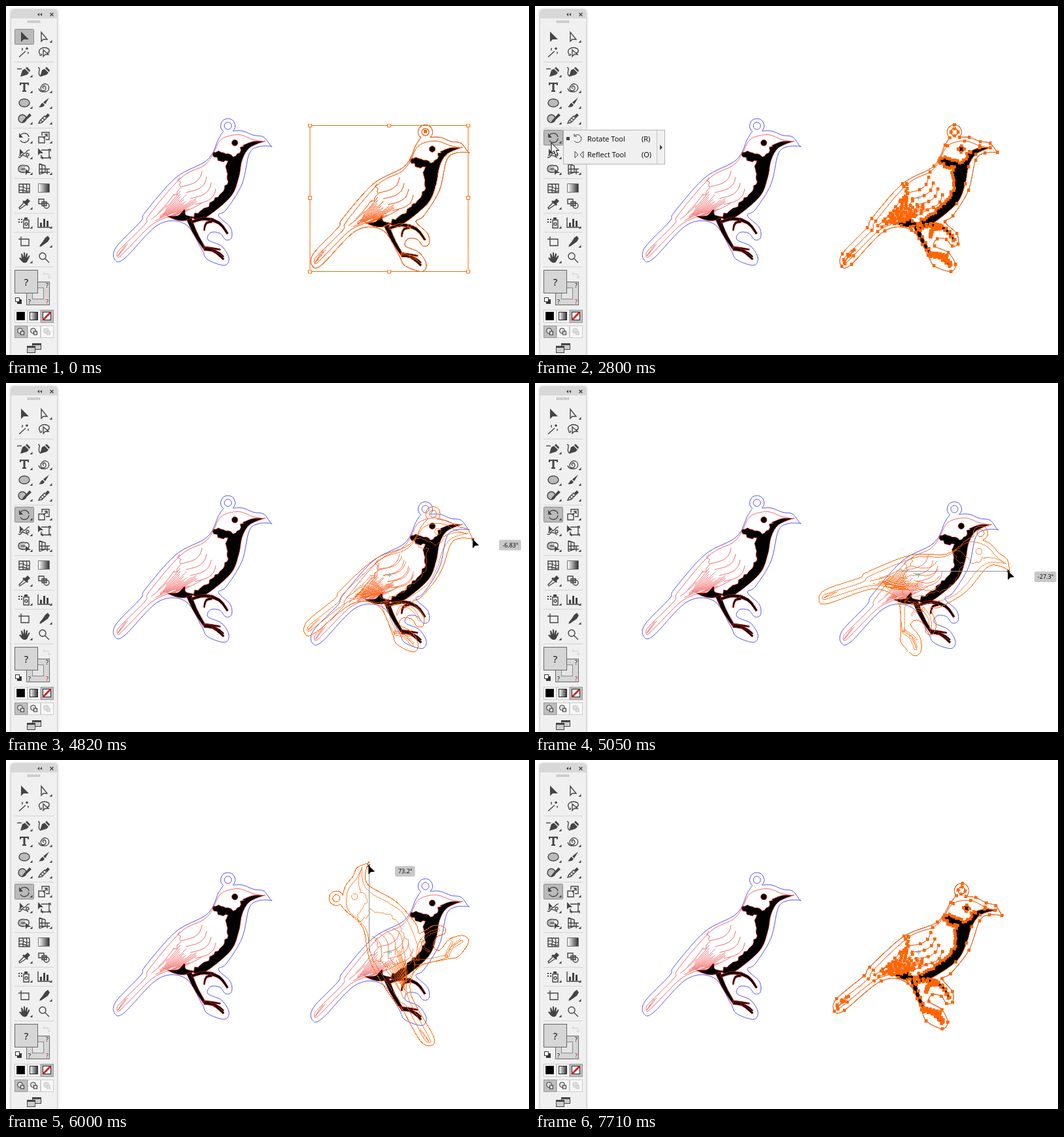
An HTML page for the animation above (8 s loop, 800 by 533 pixels).

```html
<!DOCTYPE html>
<html lang="en">
<head>
<meta charset="utf-8">
<title>Rotating a bird drawing</title>
<style>
  html, body { margin: 0; width: 100%; height: 100%; overflow: hidden; background: #fff; }
  :root { --cut: #5454f4; --score: #ee4545; --edge: #e22; --ink: #000; }
  svg { display: block; width: 800px; height: 533px; font: 9px "Open Sans", "Noto Sans", sans-serif; }
  path { fill: none; }
  .cut { stroke: var(--cut); }
  .score { stroke: var(--score); stroke-width: .8; }
  .ink { stroke: var(--edge); stroke-width: .7; fill: var(--ink); }
  .wire { --cut: #f60; --score: #f60; --edge: #f60; --ink: none; shape-rendering: crispEdges; }
  .dots { marker: url(#dot); }
  .solid { fill: #444; }
  .line { stroke: #444; stroke-width: 1.4; }
  .tint { fill: #bbb; }
  .pink { fill: #f04be0; }
  #panel { filter: drop-shadow(0 0 2px #0006); }
</style>
</head>
<body>
<svg viewBox="0 0 800 533">
  <defs>
    <marker id="dot" markerUnits="userSpaceOnUse" markerWidth="5" markerHeight="5" refX="2.5" refY="2.5">
      <path d="M0 0h5v5H0z" style="fill:#f60"/>
    </marker>
    <marker id="handle" markerUnits="userSpaceOnUse" markerWidth="6" markerHeight="6" refX="3" refY="3">
      <path d="M.5.5h5v5h-5z" style="fill:#fff" stroke="#f60"/>
    </marker>
    <linearGradient id="fade"><stop stop-color="#fff"/><stop offset="1" stop-color="#333"/></linearGradient>
    <g id="bird"></g>
  </defs>

  <use href="#bird"/>
  <use href="#bird" id="copy"/>
  <use href="#bird" id="wire" class="wire"/>
  <path id="pivot" d="M583 293.5h7M586.5 290v7" stroke="#4cc"/>
  <g id="box">
    <path d="M465 182.5H586H707V293V405.5H586H465V293Z" stroke="#f60" marker-start="url(#handle)" marker-mid="url(#handle)"/>
    <rect x="639" y="189" width="5" height="5" fill="#f60"/>
  </g>

  <g id="panel">
    <rect x="8" y="6" width="70" height="540" rx="3" fill="#f0f0f0"/>
    <path d="M8 19V9q0-3 3-3h64q3 0 3 3v10z" style="fill:#d8d8d8"/>
  </g>
  <path class="solid" d="M51 10.5l-3 2.5 3 2.5zM55 10.5l-3 2.5 3 2.5z"/>
  <path class="line" d="M67.5 10.5l5 5m0-5l-5 5"/>
  <path d="M33 24h20" stroke="#aaa" stroke-width="4" stroke-dasharray="1 1"/>
  <rect id="hover" width="29" height="23" rx="1" fill="#fcfcfc" stroke="#c4c4c4"/>
  <rect id="active" x="13.5" width="29" height="23" rx="1" fill="#bababa" stroke="#8c8c8c"/>
  <g id="icons"></g>

  <g fill="#d6d6d6" stroke="#666">
    <rect x="31.5" y="421.5" width="35" height="35"/>
    <rect x="40.5" y="430.5" width="17" height="17" fill="#e4e4e4" stroke="#888"/>
    <rect x="13.5" y="403.5" width="35" height="35"/>
    <path d="M59 407l-2 2.5h7q2 0 2 2v4m-2-2l2 2 2-2" stroke="#ccc"/>
    <rect x="17.5" y="448.5" width="6" height="6" fill="#333" stroke="#333"/>
    <rect x="14.5" y="445.5" width="6" height="6" fill="#fff" stroke="#333"/>
  </g>
  <g text-anchor="middle">
    <text x="31" y="427" font-size="15">?</text>
    <text x="63" y="430">?</text><text x="36" y="455">?</text><text x="63" y="455" fill="#c00">?</text>
  </g>
  <g id="swatches"></g>
  <g fill="#ccc" stroke="#444">
    <rect x="40.5" y="515.5" width="13" height="9"/><rect x="32.5" y="519.5" width="12" height="10"/>
    <path d="M33 521h11M41 517h12" stroke-width="2"/>
  </g>

  <g id="flyout" font-size="11">
    <rect x="43.5" y="189.5" width="155" height="52" fill="#f0f0f0" stroke="#b4b4b4"/>
    <rect id="row" x="44" y="190" width="142" height="25" fill="#d4d4d4"/>
    <path d="M186.5 190v51" stroke="#c4c4c4"/>
    <path class="solid" d="M48 200h5v5h-5zM191 212l4 4-4 4z"/>
    <path d="M60 199a6 6 0 1 1 0 7M60 195v4h4M61 222l5 5-5 5zM74 222l-5 5 5 5z" stroke="#444"/>
    <text x="80" y="207">Rotate Tool</text><text x="163" y="207">(R)</text>
    <text x="80" y="231">Reflect Tool</text><text x="163" y="231">(O)</text>
  </g>

  <path id="guide" stroke="#909090"/>
  <g id="snap">
    <path d="M576.5 258V389M390 387l5 5m0-5l-5 5M574 256l5 5m0-5l-5 5" stroke="#f04be0"/>
    <text class="pink" x="579" y="385">intersect</text>
  </g>
  <text id="anchor" class="pink" x="712" y="235">anchor</text>
  <g id="tip">
    <path d="M-2-2l4 4m0-4l-4 4" stroke="#000"/>
    <rect id="plate" x="40" y="1" height="16" rx="2" fill="#c8c8c8"/>
    <text id="angle" x="45" y="12"></text>
  </g>
  <path id="cursor" stroke="#000"/>
</svg>

<script>
const $ = id => document.getElementById(id);
const show = (id, on) => $(id).style.display = on ? "" : "none";
const path = (cls, d) => `<path class="${cls}" d="${d}"/>`;
const list = (n, make) => Array.from({ length: n }, (_, i) => make(i));

let seed = 7;
const random = () => (seed = seed * 16807 % 2147483647) / 2147483647;

// Smooth path through "x,y x,y ..." points
const curve = text => {
  const p = text.split(" ").map(s => s.split(",").map(Number));
  return p.slice(1).reduce((d, b, i) => {
    const a = p[i], before = p[i - 1] || a, after = p[i + 2] || b;
    const c1 = a.map((v, k) => v + (b[k] - before[k]) / 6);
    const c2 = b.map((v, k) => v - (after[k] - a[k]) / 6);
    return `${d}C${c1} ${c2} ${b}`;
  }, "M" + p[0]);
};
const sample = (d, n) => {
  const line = document.createElementNS("http://www.w3.org/2000/svg", "path");
  line.setAttribute("d", d);
  return list(n + 1, i => {
    const { x, y } = line.getPointAtLength(line.getTotalLength() * i / n);
    return [x, y];
  });
};
// Move points sideways by amount(0..1 along the line)
const shift = (points, amount) => points.map(([x, y], i) => {
  const last = points.length - 1, a = points[Math.max(i - 1, 0)], b = points[Math.min(i + 1, last)];
  const dx = b[0] - a[0], dy = b[1] - a[1], k = amount(i / last) / Math.hypot(dx, dy);
  return [x - dy * k, y + dx * k];
});
const limb = (text, from, to) => {
  const mid = sample(curve(text), 5), half = u => (from + (to - from) * u) / 2;
  return "M" + [...shift(mid, half), ...shift(mid, u => -half(u)).reverse()].join("L") + "Z";
};
const ragged = (text, n) => "M" + shift(sample(curve(text), n), () => (random() - .5) * 5).join("L");
const ring = (x, y, r) => `M${x - r} ${y}` + [[r, -r], [r, r], [-r, r], [-r, -r]].map(q => `a${r} ${r} 0 0 1 ${q}`).join("");

const outline = curve("347,191 362,191 379,197.5 394,200 405,214 405,214 386,215 372,226 361,272 337,311 325,320 343,338 345,354 336,357 327,347 313,346 309,357 330,367 341,385 334,396 308,387 299,371 274,333 233,334 182,385 167,388 168,369 206,329 213,315 260,262 308,235 325,203 332.5,191.5")
  + "A11 11 0 0 1 339.5 172A11 11 0 0 1 347 191Z";
const body = curve("394,207 378,204 355,196.5 329,204 316,228 302,244 267,263 219,319 213,333 176,370 170,378 172,384 185,372 222,335 247,322");
const bib = ragged("362,213 352,229 340,227 319,222 318,229 328,237 337,235 338,250 340,266 331,282 314,301 283,322", 50)
  + curve("283,323 302,325 343,292 356,262 361,236 372,217 394,207 394,207 378,207 362,213").replace("M", "L") + "Z";
const inks = [
  bib, curve("247,321 263,320 273,311 275,319 287,323 272,328 258,326 247,321"),
  limb("280,325 290,348 304,371", 8, 4), limb("302,369 314,370 328,372", 4, 2),
  limb("303,371 318,374 333,387", 5, 3), limb("315,372 326,377 333,383", 3, 2),
  limb("284,330 301,325 317,327", 4, 5), limb("313,326 328,333 339,348", 5, 3), limb("315,329 306,332 303,343", 4, 2),
  ring(350, 209, 4.7)
];
const scallops = list(4, i => {
  const x = 300 + 7 * i, y = 252 + 9 * i;
  return curve(`${x},${y} ${x - 4},${y + 11} ${x - 14},${y + 19} ${x - 32},${y + 24}`);
});
// Parts of long arcs that run together at the root of the tail
const feathers = list(18, i => {
  const u = i / 17, start = random() * .45, span = .3 + random() * .3;
  const x0 = 264 + 50 * u, y0 = 276 + 16 * u, x1 = 214 + 10 * u, y1 = 331;
  return curve(list(4, k => {
    const s = start + span * k / 3, sag = 16 * s * (1 - s);
    return [x0 + (x1 - x0) * s + sag / 2, y0 + (y1 - y0) * s + sag];
  }).join(" "));
});
const tail = [3, 6].map(i => curve(`${180 + i},${366 - i / 2} ${174 + i},${374 - i / 2} 171,382`));

$("bird").innerHTML = [outline, ring(339.5, 183, 5.5)].map(d => path("cut", d)).join("")
  + [body, ragged("264,262 266,276 258,290", 8), ...scallops, ...feathers, ...tail].map(d => path("score", d)).join("")
  + inks.map(d => path("ink", d)).join("");

// Rows of tools, in groups parted by a rule
const rows = [], rules = [];
let next = 47;
for (const size of [2, 4, 3, 2, 1, 2]) {
  for (let i = 0; i < size; i++, next += 24.2) rows.push(Math.floor(next));
  next += 4.6;
  rules.push(`M13 ${Math.floor(next - 15) + .5}h60`);
}
const rect = (x, y, w, h) => `M${x} ${y}h${w}v${h}h${-w}z`;
const nib = "M-6 8L-3-2L1-4L7 2L4 5ZM2-5L4-7L9-2L8 1Z";
// Solid part, line part, has corner mark, tinted part
const tools = [
  ["M-5-8V8L-1 4H7Z", "", 0],
  ["", "M-4-7V7L-1 4H5Z"],
  ["", "M-8 7L2-2M4-8v4M2-6h4M-3-7v4M6-1v3", 0],
  ["", "M-6 2C-11-4-2-9 4-7S9 0 5 1M-6 2c-1 4 4 3 2 0M-1-4V6L2 3H7Z", 0],
  [nib, "M-11-4H-4"],
  [nib, "M-9-6C-3-6-12 4-5 7", 0],
  ["M-7-7H7V-3H5V-5H1.5V5H3V7H-3V5H-1.5V-5H-5V-3H-7Z", ""],
  ["", "M0 2a2 2 0 1 1 2-3a4 4 0 1 1-6 0a6 6 0 1 1 6 8q-8 1-10-5"],
  ["", "M-8 0C-8-8 8-8 8 0S-8 8-8 0Z", 1, "M-8 0C-8-8 8-8 8 0S-8 8-8 0Z"],
  ["M8-8L2 2L-1-1ZM-2 0L1 3C-1 7-5 7-8 6C-5 5-5 1-2 0Z", ""],
  ["M8-8L11-5L0 5L-4 7L-2 3Z", ring(-3, 0, 6), 1, ring(-3, 0, 6)],
  ["M6-8L9-5L5-1L2-4Z", "M-8 7l2-4 7-7 3 3-7 7zM-5 2l3 3M-2-1l3 3"],
  ["M-8-7V0H-2Z", "M-6-3A7 7 0 0 1 7-1M7 1A7 7 0 0 1-6 4"],
  ["", rect(-8, -1, 9, 9) + "M-3-3V-8H8V3H3M-1 1L5-5M1-5H5V-1"],
  ["M-7-7L-1-1L-4 0L-7 3Z", "M-9 6C-3 8-4 0 0 0S3-6 8-5M-8 3q8-1 14 4" + ring(5, 2, 2)],
  ["M-9-8V3L-6 0H-1Z", "M-4-5H8V7H-4V2M7-6h3v3M7 6h3v3M-5 6h3v3", 0],
  ["M2 0V9L5 6H10Z", "M-9 0C-9-7 0-6 1-5C9-7 9 4 3 4C0 6-9 6-9 0M-5 0h6", 1, ring(-3, 0, 5)],
  ["", "M-7-8V8M-7-8L2-5V5L-7 8M-3-7V7M-7 0H9M-7 5H9M5 0V8"],
  ["", rect(-8, -6, 16, 13) + "M-8-1C-3-6 3 5 8 0M-3-6C2-1-5 3-1 7M3-6C6 0 1 4 4 7M-8 4C-3 0 3 8 8 4", 0],
  ["", rect(-8, -6, 16, 12), 0],
  ["M1-4L5-8L9-4L5 0L6 2L4 3L-3-3L-1-5Z", "M-1-1L-8 6L-7 8L2 2"],
  ["", rect(-8, -7, 8, 7) + rect(-3, -3, 7, 6) + ring(4, 3, 4), 0, rect(-3, -3, 7, 6)],
  [[-9, -5].map(x => rect(x, -6, 2, 2) + rect(x, -2, 2, 2)).join("") + rect(0, -8, 5, 3), rect(-1, -4, 8, 12) + ring(3, 2, 2)],
  [rect(-6, 0, 3, 6) + rect(-1, -6, 3, 12) + rect(4, -3, 3, 9), "M-9-8V7H10"],
  ["", "M-5-8V2M-9-4H2M-4-4H7V6H-5V-1", 0],
  ["M2-6L6-9L9-5L6 0L-4 7L-7 8Z", "M-6 6L3-4"],
  ["M-8 1q2-2 4 1L-5-5q1-2 2 0L-1 0V-7q1-2 2 0V0L3-6q2-1 2 1L4 1L7-3q2 0 1 2L4 7Q0 10-4 6Z", ""],
  ["", ring(-2, -2, 5) + "M2 2L8 8", 0]
];
$("icons").innerHTML = `<path d="${rules.join("")}" stroke="#d4d4d4"/>`
  + tools.map(([solid, line, corner = 1, tint = ""], i) =>
    `<g transform="translate(${28 + i % 2 * 30} ${rows[i >> 1]})">${path("tint", tint)}${path("line", line)}`
    + path("solid", solid + (corner ? "M12.5 5v4h-4z" : "")) + "</g>").join("")
  + '<rect x="50" y="272" width="16" height="12" fill="url(#fade)"/>';
$("swatches").innerHTML = ["#000", "url(#fade)", "#fff"].map((fill, i) => {
  const x = 13.5 + 20 * i, pale = i === 2 ? "#ccc" : "#333";
  const cell = (y, h, on) => `<rect x="${x}" y="${y}" width="19" height="${h}" fill="${on ? "#bebebe" : "#f8f8f8"}" stroke="${on ? "#999" : "#ccc"}"/>`;
  return cell(464.5, 19, i === 2) + `<rect x="${x + 3}" y="467.5" width="12" height="12" fill="${fill}" stroke="#222"/>`
    + cell(488.5, 18, i === 0) + `<g stroke="${pale}" fill="#ddd"><circle cx="${x + 8}" cy="496" r="4"/><rect x="${x + 9}" y="497" width="5" height="5"/></g>`;
}).join("") + '<path d="M57 479l11-11" stroke="#d22" stroke-width="3"/>';

// Motion runs in bursts of held steps: start, end, steps
const bursts = [[700, 1480, 11], [1560, 1950, 6], [3360, 3490, 3], [3670, 4120, 7],
  [4820, 5600, 11], [5680, 6460, 11], [7560, 7710, 3]];
const hold = t => {
  const burst = bursts.filter(b => b[0] <= t).pop();
  if (!burst) return 0;
  const [start, end, count] = burst, step = (end - start) / (count - 1);
  return Math.min(end, start + Math.floor((t - start) / step + .1) * step);
};
const at = (keys, t) => {
  const i = keys.findIndex(k => k[0] > t);
  if (i < 0) return keys[keys.length - 1].slice(1);
  const b = keys[i], a = keys[i - 1] || b, u = a === b ? 0 : (t - a[0]) / (b[0] - a[0]);
  return a.slice(1).map((v, k) => v + (b[k + 1] - v) * u);
};

const pointer = [[700, 600, 504], [1246, 90, 196], [1480, 26, 285], [1716, 21, 239], [1950, 25, 209],
  [3360, 26, 209], [3490, 84, 203], [3670, 84, 203], [4120, 707, 222], [6460, 714, 237], [7635, 50, 115]];
// Clockwise turn and distance of the grabbed point from the pivot
const turning = [[4742, 0, 140], [5054, 27.3, 138], [5444, 125.88, 96], [5992, 286.8, 136], [6460, 366.5, 140]];
const guides = { 5054: "M556 287.5H726", 5444: "M247 389.5H576", 5992: "M555.5 162V294" };
const shapes = {
  arrow: ["M0 0V16L4 12L6.5 18.5L9.5 17L7 11.5H11.5Z", "#fff"],
  cross: ["M-7 .5H8M.5-7V8", "none"],
  drag: ["M0 1V13L3 9.5L8.5 9Z", "#000"]
};
const place = turn => `rotate(${turn} 586 293.5) translate(302 9.5)`;

function draw() {
  const t = performance.now() % 8000, step = hold(t);
  const rotating = t >= 2480, dragging = t >= 4820 && t < 7010, dropped = t >= 7010;
  const visible = t >= 700 && t < 7700, snapped = dragging && step === 5444;
  const [turn, reach] = at(turning, step);
  let [x, y] = at(pointer, step);

  $("copy").setAttribute("transform", place(dropped ? turn : 0));
  $("wire").setAttribute("transform", place(turn));
  $("wire").classList.toggle("dots", rotating && !dragging);
  show("box", !rotating);
  show("pivot", rotating);
  $("active").setAttribute("y", rotating ? 189.5 : 35.5);

  const row = rows.find(r => Math.abs(y - r) <= 12);
  show("hover", visible && x > 13 && x < 73 && row);
  $("hover").setAttribute("x", x < 43 ? 13.5 : 43.5);
  $("hover").setAttribute("y", (row || 0) - 11.5);

  show("flyout", t >= 2800 && t < 3670);
  show("row", step >= 3425);
  show("anchor", t >= 4350 && t < 4820);
  show("snap", snapped);
  show("tip", dragging);
  $("guide").setAttribute("d", dragging && guides[step] || "");

  if (dragging) {
    const a = (turn - 30) * Math.PI / 180;
    x = 586 + reach * Math.cos(a);
    y = 293.5 + reach * Math.sin(a);
    $("tip").setAttribute("transform", `translate(${x} ${y})`);
    $("angle").textContent = +(turn > 180 ? 360 - turn : -turn).toFixed(2) + "°";
    $("plate").setAttribute("width", $("angle").getComputedTextLength() + 9);
    if (snapped) { x -= 23; y -= 4; }
  }
  const [d, fill] = shapes[dragging ? "drag" : rotating && x > 100 ? "cross" : "arrow"];
  show("cursor", visible);
  $("cursor").setAttribute("d", d);
  $("cursor").style.fill = fill;
  $("cursor").setAttribute("transform", `translate(${x} ${y})`);
  requestAnimationFrame(draw);
}
draw();
</script>
</body>
</html>
```
